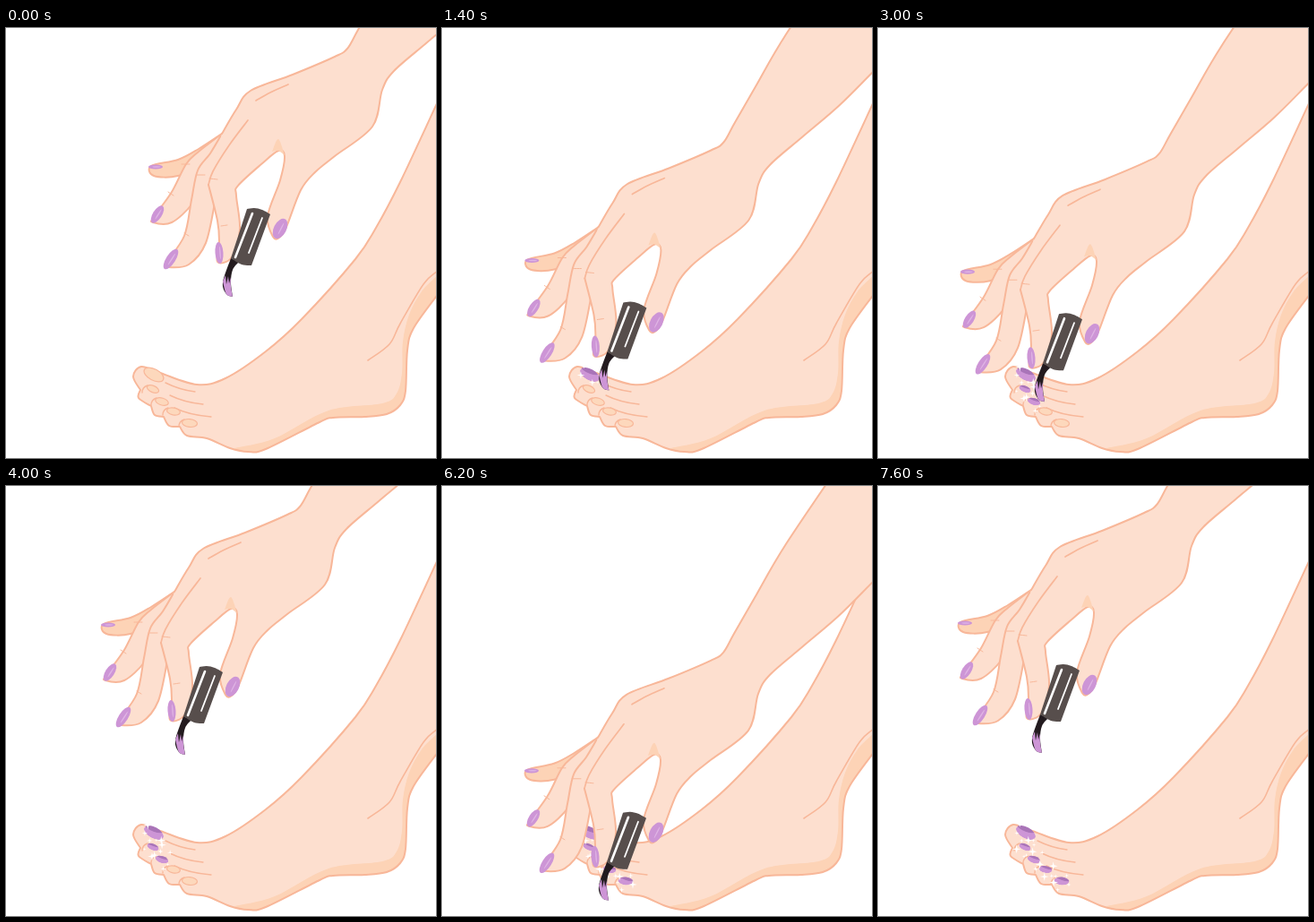
An HTML page with a canvas that plays this animation: 480 px wide and 480 px high, repeating every 7.7 s.

```html
<!DOCTYPE html>
<html lang="en">
<head>
<meta charset="utf-8">
<title>Pedicure</title>
<style>
html, body { margin: 0; width: 100%; height: 100%; overflow: hidden; background: #fff; }
canvas { display: block; width: 480px; height: 480px; }
</style>
</head>
<body>
<canvas id="stage" width="480" height="480"></canvas>
<script>
const ctx = document.getElementById('stage').getContext('2d');
const SKIN = '#fddfcf', SHADE = '#fdd3b6', LINE = '#f8b799';
const LILAC = '#cd95d6', GLOSS = '#dfb4e4', PLUM = '#a974b8', DARK = '#574e4c', INK = '#231b1f';
const LOOP = 7700, STEP = 100, PERIOD = 1600;

// Smooth path through points; "|" marks a sharp corner between runs.
function curve(text) {
  let d = '';
  for (const run of text.split('|')) {
    const p = run.trim().split(/\s+/).map(s => s.split(',').map(Number));
    d += (d ? 'L' : 'M') + p[0];
    for (let i = 0; i < p.length - 1; i++) {
      const a = p[i - 1] || p[i], b = p[i], c = p[i + 1], e = p[i + 2] || c;
      const c1 = b.map((v, k) => v + (c[k] - a[k]) / 6);
      const c2 = c.map((v, k) => v - (e[k] - b[k]) / 6);
      d += `C${c1} ${c2} ${c}`;
    }
  }
  return new Path2D(d);
}
function oval(x, y, rx, ry, angle) {
  const path = new Path2D();
  path.ellipse(x, y, rx, ry, angle, 0, 7);
  return path;
}
function fill(path, color) { ctx.fillStyle = color; ctx.fill(path); }
function line(path, width = 2, color = LINE) {
  ctx.lineWidth = width;
  ctx.strokeStyle = color;
  ctx.stroke(path);
}
function shape(path, color, width) { fill(path, color); line(path, width); }

const foot = curve(`482,82 440,172 413,223 390,258 330,325 290,361 245,391 213,398 172,385 151,378 142,389 150,404
  | 150,404 148,413 162,422 | 162,422 166,432 176,434 | 176,434 182,444 194,445
  | 194,445 202,455 224,458 250,469 270,473 290,470 350,440 365,435 400,434 425,431 440,421 446,405
  448,360 455,335 483,296`);
const sole = curve('483,275 464,294 450,320 443,350 442,385 436,408 420,419 360,427 300,458 255,469 | 260,480 480,480');
const tendon = curve('482,271 466,286 440,330 428,353 404,371');

const pinky = curve('241,118 215,135 192,147 162,154 165,165 192,165 225,150');
const ring = curve('241,118 215,138 201,152 185,183 165,211 164,217 185,217 208,196 220,170');
const middle = curve('241,118 228,140 214,159 207,192 199,232 179,262 181,267 204,264 223,240 234,190');
const palm = curve(`241,118 257,91 273,70 320,52 367,32 381,23 393,2 416,-38 451,-98 520,-200
  | 640,-150 550,-58 510,-18 469,17 433,48 420,69 409,110 367,143 345,161 329,181 313,222 305,234 298,233
  292,210 306,170 311,143 304,137 285,152 259,176 257,187 261,225 252,256 236,261 238,238 236,215 226,175`);
const web = curve('297,138 304,124 311,142 | 311,142 304,137 297,138');
const creases = ['226,175 231,160 249,131 270,103', '279,81 295,72 315,63'].map(curve);
const wrinkles = ['196,152 205,152', '212,164 222,164', '227,168 236,169', '240,221 247,220', '199,229 204,232', '181,183 187,187'].map(curve);
const nails = [[167, 155, 8, 2.6, 0], [169, 208, 11, 5, -1], [184, 258, 13, 5.2, -1], [238, 251, 12, 4.5, 1.5], [306, 224, 12, 7, -1.1]];

const cap = curve('269,202 277,201 286,203 295,208 | 274,265 263,264 251,257');
const shine = curve('275,207 256,256'), glint = curve('286,212 271,251');
const bristles = curve('251,257 260,261 | 260,261 253,270 251,284 253,300 | 253,300 246,297 242,284 251,257');
const tip = curve('242,283 | 245,276 246,286 | 248,277 249,285 | 251,278 251,288 253,300 | 253,300 246,297 242,283');

const mix = (a, b, u) => a + (b - a) * u;
const ease = u => u * u * (3 - 2 * u);
const noise = n => { const v = Math.sin(n * 12.9898) * 43758.5453; return v - Math.floor(v); };

// Each stroke starts at a rest pose, touches its toe, sweeps aside and returns.
const TOUCH = 0.375, AWAY = 0.845;
const restAt = n => n < 0 ? 0 : n ? 800 + PERIOD * n : 860;
const restX = n => n < 0 ? 0 : -36 - 8.5 * n;
const touchAt = n => mix(restAt(n - 1), restAt(n), TOUCH);

const toes = [[165, 387, 12], [164, 403, 7], [174, 417, 7.5], [187, 428, 7.5], [205, 441, 8.5]].map(([x, y, r], n) => ({
  x, y, nail: oval(x, y, r, r * 0.52, 0.5 - 0.1 * n), paintAt: touchAt(n)
}));

function handAt(t) {
  let n = 0;
  while (n < 4 && t >= restAt(n)) n++;
  const u = Math.min(1, (t - restAt(n - 1)) / (restAt(n) - restAt(n - 1)));
  const touch = [-67, 102 + 3.8 * n * n], away = [-155, 42];
  if (u < TOUCH) {
    const e = ease(u / TOUCH);
    return [mix(restX(n - 1), touch[0], e), mix(0, touch[1], e)];
  }
  if (u < AWAY) {
    const a = (u - TOUCH) / (AWAY - TOUCH) * Math.PI / 2;
    return [mix(touch[0], away[0], Math.sin(a)), mix(touch[1], away[1], 1 - Math.cos(a))];
  }
  const e = ease((u - AWAY) / (1 - AWAY));
  return [mix(away[0], restX(n), e), mix(away[1], -2, e)];
}

function star(x, y, r) {
  ctx.fillStyle = '#fff';
  ctx.beginPath();
  for (let i = 0; i < 8; i++) {
    const d = i % 2 ? r * 0.25 : r, a = i * Math.PI / 4;
    ctx.lineTo(x + d * Math.cos(a), y + d * Math.sin(a));
  }
  ctx.fill();
}

function drawFoot(t) {
  fill(foot, SKIN);
  ctx.save();
  ctx.clip(foot);
  fill(sole, SHADE);
  ctx.restore();
  line(foot);
  line(tendon, 1.6);
  for (let i = 0; i < 3; i++)
    line(new Path2D(`M${178 + 5 * i},${396 + 14 * i}q16,8 ${33 + 4 * i},10`), 1.4);

  toes.forEach(({ x, y, nail, paintAt }, n) => {
    if (n) line(new Path2D(`M${x - 12},${y + 4}q0,-6 6,-8`), 1.4);
    if (t < paintAt) return shape(nail, '#fdd8bc', 1.2);
    ctx.save();
    ctx.clip(nail);
    fill(nail, LILAC);
    fill(oval(x + 1, y - 5, 11, 4, 0.35), PLUM);
    ctx.restore();
  });
  toes.forEach(({ x, y, paintAt }, n) => {
    if (t < paintAt) return;
    for (let i = 0; i < 5; i++) {
      const seed = n * 5 + i + 1, angle = i * 1.257 + noise(seed), reach = 9 + 5 * noise(seed + 40);
      const size = 3.4 + 1.6 * Math.sin(t / 160 + seed * 2.1);
      star(x + reach * Math.cos(angle), y + reach * 0.8 * Math.sin(angle), size);
    }
  });
}

function drawHand([x, y]) {
  ctx.save();
  ctx.translate(x, y);
  shape(pinky, SHADE);
  shape(ring, SKIN);
  shape(middle, SKIN);
  shape(palm, SKIN);
  fill(web, SHADE);
  creases.forEach(p => line(p, 1.7));
  wrinkles.forEach(p => line(p, 1));
  fill(bristles, INK);
  fill(tip, LILAC);
  fill(cap, DARK);
  line(shine, 2.6, '#fff');
  line(glint, 1.8, '#fff');
  for (const [cx, cy, rx, ry, angle] of nails) {
    fill(oval(cx, cy, rx, ry, angle), LILAC);
    fill(oval(cx + 1, cy, rx * 0.6, 0.7, angle), GLOSS);
  }
  ctx.restore();
}

function frame(now) {
  start ??= now;
  const t = Math.floor((now - start) % LOOP / STEP) * STEP;
  ctx.clearRect(0, 0, 480, 480);
  drawFoot(t);
  drawHand(handAt(t));
  requestAnimationFrame(frame);
}
let start;
ctx.lineJoin = ctx.lineCap = 'round';
requestAnimationFrame(frame);
</script>
</body>
</html>
```
